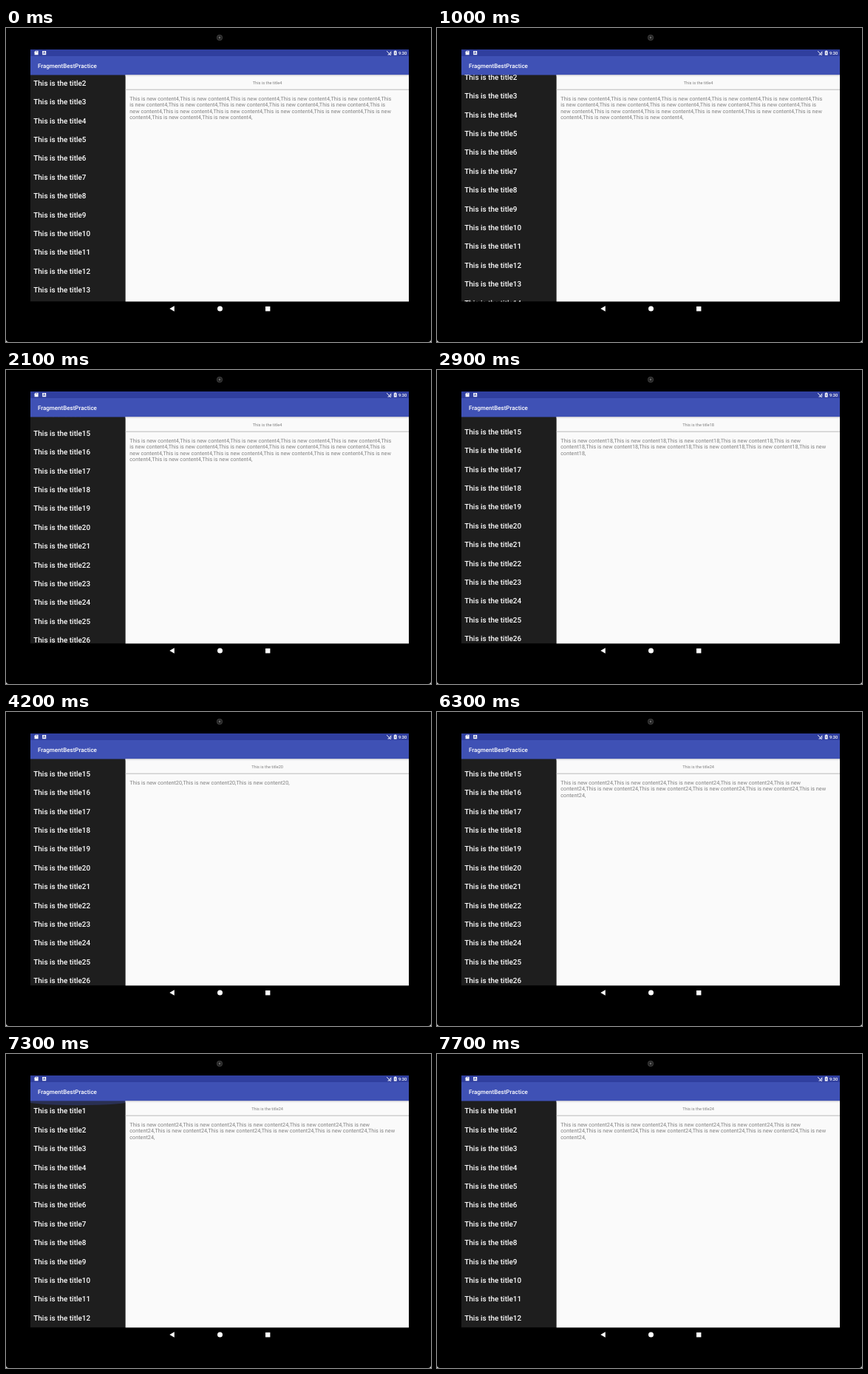
An HTML page with a canvas for the animation above (8000 ms loop, 575 by 424 pixels).

```html
<!DOCTYPE html>
<html lang="en">
<head>
<meta charset="utf-8">
<title>Two-pane news</title>
<style>
html, body { margin: 0; width: 100%; height: 100%; overflow: hidden; background: #000; }
canvas { display: block; width: 575px; height: 424px; }
</style>
</head>
<body>
<canvas id="stage"></canvas>
<script>
const W = 575, H = 424, LOOP = 8000, STEP = 100;
const canvas = document.getElementById('stage');
const dpr = window.devicePixelRatio || 1;
canvas.width = W * dpr;
canvas.height = H * dpr;
const g = canvas.getContext('2d');
g.scale(dpr, dpr);
g.textRendering = 'geometricPrecision';

const FONT = 'Roboto, "Open Sans", sans-serif';
const LEFT = 33, SPLIT = 161.6, RIGHT = 545;    // pane edges
const TOP = 63.3, BOTTOM = 369.4, ROW = 25.41;

// List offsets, one per 100 ms from the start of each fling
const flings = [
  { start: 1000, offsets: [8, 42, 87, 127, 159.4, 192, 215, 227] },
  { start: 1900, offsets: [250, 296, 319.3, 320.8, 321.3] },
  { start: 6800, offsets: [309, 233, 138, 68, 12, -28] }
];

// The article shown from each time on
const articles = [
  { start: 0, id: 4, repeats: 18 },
  { start: 2900, id: 18, repeats: 10 },
  { start: 4200, id: 20, repeats: 3 },
  { start: 5300, id: 22, repeats: 3 },
  { start: 6300, id: 24, repeats: 10 }
];

const latest = (list, t) => list.filter(item => item.start <= t).pop();

function scrollAt(t) {
  const fling = latest(flings, t);
  if (!fling) return 0;
  const i = Math.floor((t - fling.start) / STEP);
  return fling.offsets[Math.min(i, fling.offsets.length - 1)];
}

function rect(x, y, w, h, color) {
  g.fillStyle = color;
  g.fillRect(x, y, w, h);
}

function circle(x, y, r, color) {
  g.fillStyle = color;
  g.beginPath();
  g.arc(x, y, r, 0, 7);
  g.fill();
}

function shape(color, ...points) {
  g.fillStyle = color;
  g.beginPath();
  points.forEach(([x, y]) => g.lineTo(x, y));
  g.fill();
}

function text(str, x, y, size, color, weight = 400, align = 'left') {
  g.font = `${weight} ${size}px ${FONT}`;
  g.fillStyle = color;
  g.textAlign = align;
  g.fillText(str, x, y);
}

function drawDevice() {
  rect(0, 0, W, H, '#ddd');
  g.fillStyle = '#000';
  g.beginPath();
  g.roundRect(0, -10, W, H + 10, 4);
  g.fill();
  circle(289, 13, 4, '#3c3c3c');
  circle(289, 13, 2.8, '#1c1c1c');
  circle(289, 13, 1.4, '#666');

  shape('#fff', [221.3, 379], [227.8, 375.2], [227.8, 382.8]);
  circle(289.5, 379, 3.5, '#fff');
  rect(351, 376, 6.4, 6.4, '#fff');
}

function drawBars() {
  rect(LEFT, 29, RIGHT - LEFT, 9, '#303f9f');
  rect(LEFT, 38, RIGHT - LEFT, 26, '#3f51b5');
  text('FragmentBestPractice', 43, 54.4, 8, '#fff', 500);

  shape('#fff', [38.6, 32.2], [40, 30.8], [43.6, 30.8], [43.6, 36.2], [38.6, 36.2]);
  rect(40.3, 31.4, 2, 1.3, '#7c86c4');
  rect(49.2, 31, 5, 5.2, '#fff');
  text('A', 51.7, 35.4, 4.8, '#303f9f', 700, 'center');

  // Signal wedge, struck through
  shape('#c5cae9', [516, 36.4], [521.3, 36.4], [521.3, 31]);
  g.lineWidth = 0.9;
  for (const [shift, color] of [[0.9, '#303f9f'], [0, '#fff']]) {
    g.strokeStyle = color;
    g.beginPath();
    g.moveTo(515 + shift, 31.2);
    g.lineTo(521 + shift, 36.8);
    g.stroke();
  }
  rect(524.8, 31.2, 3.8, 5.4, '#fff');
  rect(525.8, 30.5, 1.8, 0.8, '#fff');
  rect(526.3, 32.6, 0.9, 2.6, '#303f9f');
  text('9:30', 531, 36, 5.65, '#fff', 500);
}

function drawGlow(t) {
  const age = Math.floor((t - 7300) / STEP);
  if (age < 0 || age > 3) return;
  g.fillStyle = 'rgba(63, 81, 181, .35)';
  g.beginPath();
  g.ellipse(97.5, TOP, 72, [6, 9, 6.5, 4][age], 0, 0, Math.PI);
  g.fill();
}

function drawList(t) {
  const offset = scrollAt(t);
  g.save();
  g.beginPath();
  g.rect(LEFT, TOP, SPLIT - LEFT, BOTTOM - TOP);
  g.clip();
  rect(LEFT, TOP, SPLIT - LEFT, BOTTOM - TOP, '#1e1e1e');
  for (let n = 1; n <= 50; n++) {
    const y = 77.7 + ROW * (n - 2) - offset;
    if (y > 55 && y < 385) text('This is the title' + n, 37.3, y, 9.95, '#fff', 500);
  }
  drawGlow(t);
  g.restore();
}

function drawArticle(t) {
  const { id, repeats } = latest(articles, t);
  const width = RIGHT - SPLIT;
  rect(SPLIT, TOP, width, BOTTOM - TOP, '#fafafa');
  rect(SPLIT, TOP, width, 1, '#c6c6ca');
  rect(SPLIT, TOP + 1, width, 1, '#e9e9eb');
  rect(SPLIT, 82.7, width, 1, '#bbb');
  text('This is the title' + id, 353.6, 75.9, 5.64, '#808080', 400, 'center');

  const words = `This is new content${id},`.repeat(repeats).split(' ');
  const perLine = id < 10 ? 16 : 15;
  for (let i = 0; i * perLine < words.length; i++) {
    const line = words.slice(i * perLine, (i + 1) * perLine).join(' ');
    text(line, 167.3, 97.9 + i * 8.42, 7.25, '#808080');
  }
}

function frame(now) {
  const t = now % LOOP;
  drawDevice();
  drawBars();
  drawList(t);
  drawArticle(t);
  requestAnimationFrame(frame);
}
requestAnimationFrame(frame);
</script>
</body>
</html>
```
